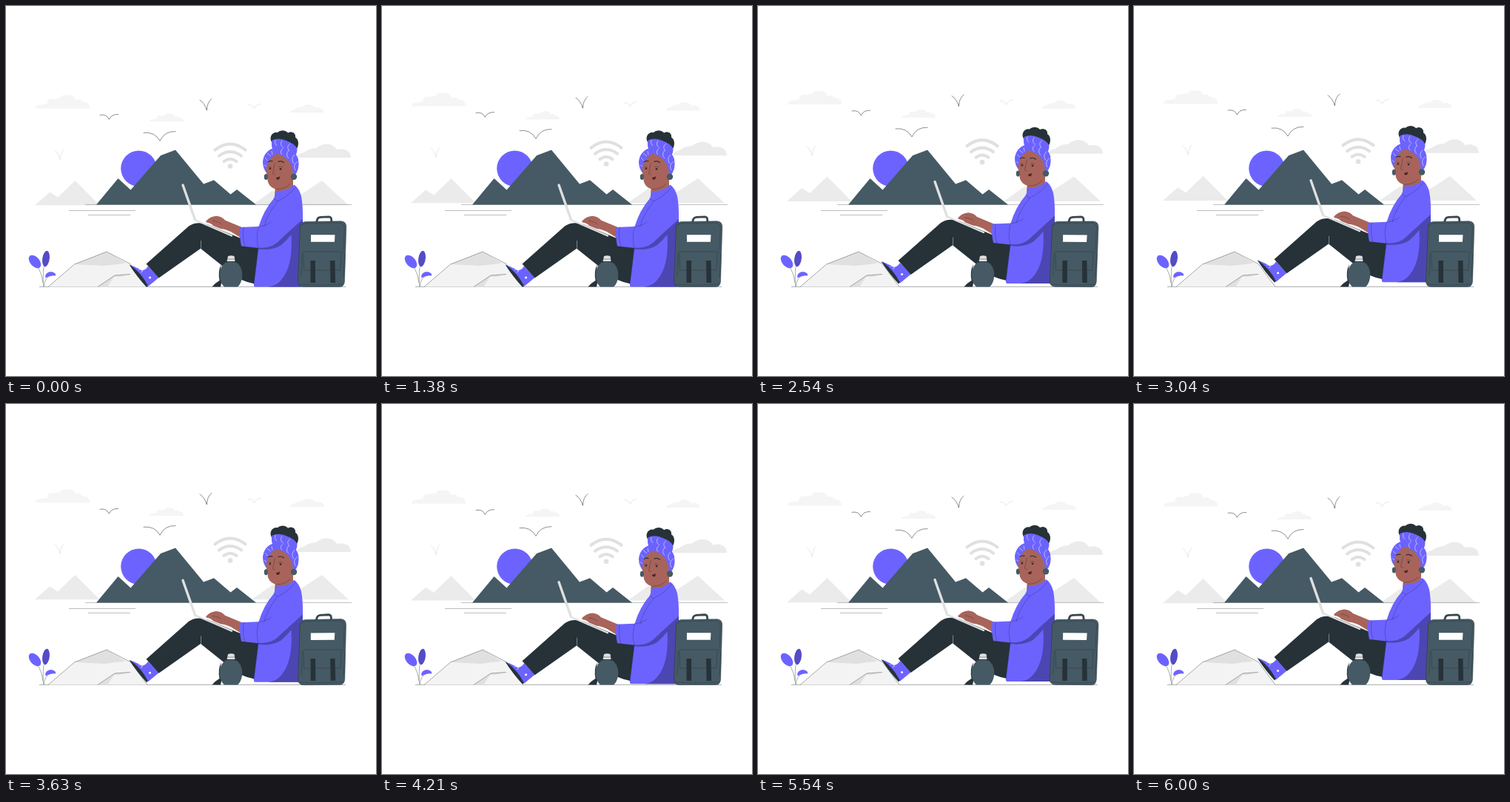
Animation of 500x500 px, one loop 6.04 s. Source, as an HTML page:

```html
<!DOCTYPE html>
<html lang="en">
<head>
<meta charset="utf-8">
<title>Working outdoors</title>
<style>
  html, body { margin: 0; width: 100%; height: 100%; overflow: hidden; background: #fff; }
  svg { display: block; width: 100vw; height: 100vh; }
  .line { fill: none; stroke: #263238; stroke-width: .55; stroke-linecap: round; stroke-linejoin: round; }
  .thin { fill: none; stroke: #263238; stroke-width: .4; }
  .faint { stroke: #d5d5d5; }
  .seam { stroke: #302b78; stroke-width: .4; }
  .slate { fill: #455a64; }
  .dark { fill: #263238; }
  .violet { fill: #6c63ff; }
  .shade { fill: #4c46b3; }
  .skin { fill: #a8645a; }
  .pale { fill: #f5f5f5; }
  .mist { fill: #ebebeb; }
  .grey { fill: #e0e0e0; }
</style>
</head>
<body>
<svg viewBox="0 0 500 500">
  <defs>
    <path id="cloud" d="M0 18.5C0 14 4 13 8 13.5Q12 11.5 15.5 12.5C15 6 21 4 25 6Q28 4 32 5C35 0 40-.5 44 .8C49-.5 53 3 54 7C58 5 62 6.5 63 9.5C69 9 73 12 73 18.5Z"/>
    <path id="dome" d="M0 18.5C0 14 5 12 9 11.5Q15 6 26 5.5Q32 0 40 0Q49 0 54 8Q60 5.5 65 8Q72 9.5 72.5 18.500Z"/>
  </defs>

  <g id="sky">
    <use href="#cloud" class="pale" x="40" y="120"/>
    <use href="#cloud" class="pale" transform="translate(194 145) scale(.63 .6)"/>
    <use href="#dome" class="pale" transform="translate(384 133) scale(.63 .6)"/>
    <use href="#dome" class="mist" x="393.5" y="186.5"/>
    <path class="mist" d="M39 269.300L59 251.500L70 258.500L93.500 236L126.500 269.300ZM332 269.300L360 249.500L384 264L427 236L463 269.300Z"/>
  </g>

  <circle class="violet" cx="179.400" cy="219.600" r="24.200"/>
  <path class="slate" d="M122 268.500L151.500 233L168.500 248.500L209 202L229 194.500L267 240.500L281 235.300L303.500 254.500L312 248L338 268.500Z"/>
  <path class="thin" opacity=".8" d="M107 268.400H467M85 276.500H175M111 282.400H168"/>

  <g id="air">
    <g class="line">
      <path d="M127 147.300Q136 145.500 139.300 153.300Q142.500 146 151.500 146.500"/>
      <path d="M186 171.300Q201 169.500 208 182.300Q214 169 229 169.500"/>
      <path d="M262 127Q268.500 131 271.300 141Q271.800 130 278 125.300"/>
      <path class="faint" d="M327 133.500Q333 133 335.500 138.800Q337.500 132.800 344 132.500M66 195Q71 199 73 207.500Q73.500 199 78 194"/>
    </g>
    <path fill="none" stroke="#e0e0e0" stroke-width="4" stroke-linecap="round" d="M282.500 194.500Q303 178.500 323.500 194.500M288 202.500Q303 191.500 318 202.500M294.500 210Q303 203.500 311.500 210"/>
    <circle class="grey" cx="303" cy="216.500" r="3.300"/>
  </g>

  <path class="thin" d="M45 379.400H459"/>

  <g id="rock">
    <path fill="#f3f3f3" d="M57 379.500L92.500 349L136 332L168 348.500L191 379.500Z"/>
    <path class="grey" d="M92.500 349L136 332L162 347.500L133 351ZM124 379.500L147 364L168 362.500L155 366L146 366L137 379.500Z"/>
    <path class="thin" d="M57 379.500L92.500 349L136 332L168 348.500L191 379.500M124 379.500L147 364L168 362.500"/>
  </g>

  <g id="plant">
    <path class="thin" d="M51 379Q49 362 41 349M50 374Q49 356 54 338M51 379Q52 367 62 363"/>
    <ellipse class="violet" cx="39" cy="345.500" rx="6.300" ry="10.300" transform="rotate(-42 39 345.500)"/>
    <ellipse cx="54" cy="341.500" rx="4.800" ry="10.800" transform="rotate(8 54 341.500)" fill="#544cc6"/>
    <path class="violet" d="M53.500 367.500C52 361 58 358.500 63 359.500Q68 361 67 364.500Q62 363.500 53.500 367.500Z"/>
  </g>

  <g id="woman">
    <g id="shoe">
      <path class="violet" d="M167 350Q177 353 183 357.500Q189 357 192 351.500L206.500 367L192 379Z"/>
      <path class="dark" d="M166.500 349.500L169 351Q183 361 191.800 378L190 380Q177 366 166.500 349.500Z"/>
      <path d="M179 357l3-3M182 360l3-2" stroke="#fff" stroke-width=".7"/>
      <circle cx="194.500" cy="367" r="1.500" fill="#fff"/>
    </g>
    <path class="dark" d="M189.500 348.500L247 297.500Q257 290.500 272 295L315 313L345 320V376.500Q325 375 311 366L289 348.500L263 327.800L206.500 367.500Z"/>
    <path d="M263.500 317V328" stroke="#fff" stroke-width=".4"/>

    <g id="laptop" fill="none" stroke="#e0e0e0" stroke-linecap="round">
      <path d="M257 289.800L305 310.500" stroke-width="2.200"/>
      <path d="M239 242L255.500 289" stroke-width="3.400"/>
    </g>
    <path class="skin" d="M270 291Q276 284.300 284 283.800Q291 284 296 289.500L320 299.500V315L308 307.500Q300 302 290 301L280 297Q277 293 271 292.500Z"/>
    <path class="thin" d="M279 290.500Q287 290.500 291 295"/>

    <path class="skin" d="M364 239L388 232V246L378 255L363 256Z"/>
    <path class="violet" d="M362 260L365 250Q380 251 389.500 241.500Q396 246 399 257Q401.500 270 401 290L399 379.500H337Q334.500 379.500 335 376L341 327L318 324.500Q315 311 316.500 299L341.500 298Q348 276 362 260Z"/>
    <path class="shade" d="M401 288Q382 305 366 320Q356 328 341 326.500V328.500Q360 331 372 323Q380 316 385.500 309Q388 352 372 370Q366 378 355 379.500H399Z"/>
    <path class="line seam" d="M362 260L367 264Q383 256 391 245M367 264Q353 281 349 298M341.500 298Q337 313 341 327M321 299Q319 313 323 325M343 298Q352 297 358 292M341 327L335 376"/>

    <g id="head">
      <path class="dark" d="M359 184C355 177 360 169.500 367 171C371 166.500 379 168 381 171.500C387 168 392 173 391 177.500C397 181 395.500 191 391.500 195Q374 187 359 184Z"/>
      <path class="violet" d="M359.500 181.500Q369 177 380 182.500Q390 186 393.500 193Q393.500 200 390 203L362 197Q357.500 190 359.500 181.500Z"/>
      <path class="violet" d="M352.500 226Q347 220 347 210Q349 194 366 191Q389 189 395 207Q397.500 222 389 230Z"/>
      <path class="skin" d="M351.500 223Q352 207 366 199.500Q382 204 387 219L388 236Q380 247.500 367 248Q357 246.500 354 238Z"/>
      <path fill="none" stroke="#d8d5ff" stroke-width=".7" d="M350 205l4 4M353 199l5 4M359 196l1 5M374 193Q369 197 373 201M382 195Q377 201 382 206M390 201Q384 207 389 213M394 210Q387 215 391 222M364 181Q362 186 366 189M373 182Q369 188 375 192M384 186Q378 190 383 196M349 215l3 2"/>
      <path class="line" style="stroke-width:1.200" d="M354.500 210.500Q357 208.800 360 209.800M368 210.500Q371 208.500 375.500 211.500"/>
      <circle class="dark" cx="356.800" cy="219.800" r="1.300"/>
      <circle class="dark" cx="371" cy="220.300" r="1.400"/>
      <path class="thin" d="M354 217.500Q357 216.500 359 218.500M368 217.500Q371 216 374 218.500M363.500 212Q361.500 221 360.500 226.500Q362 228 364 227.500"/>
      <path fill="#4b2426" d="M364.500 232.500Q367 231.500 369.500 230.300Q370.500 234.500 367.500 234.700Q365.500 234.500 364.500 232.500Z"/>
      <path class="thin" d="M365 247.500Q377 248 384 240"/>
      <ellipse class="slate" cx="351.300" cy="231" rx="2.500" ry="4"/>
      <circle class="slate" cx="389" cy="230.700" r="4.200"/>
    </g>
  </g>

  <g id="bag">
    <path fill="none" stroke="#37474f" stroke-width="2.800" d="M419.500 292L421 287.500Q422 285.500 425 285.300L436 284.800Q439 285 439.500 287L440 292"/>
    <path class="slate" stroke="#263238" stroke-width=".5" d="M397.500 298Q398.500 291.800 405 291.400L453 290.800Q460 291.300 459.800 299L457.500 372Q457 379.300 451 379.500H402Q394.500 379.500 394.500 372Z"/>
    <path class="thin" d="M399 297Q401 293.500 408 293.500L450 293Q457 293 457.500 300L456 330M397 376Q425 378.500 455 376M400 334Q401 332 405 332H454Q458 333 457.500 338L456 367M402 334L402.500 357H452L453 334M400 334L399 365"/>
    <path fill="#fff" d="M412 309.300H444.500L444 318.800H412Z"/>
    <path class="dark" d="M411.500 344H418V374H411.500ZM438 344H444.500L445 374H438.500Z"/>
  </g>

  <g id="bottle">
    <path class="dark" d="M291 349Q286 358 288.500 371Q283 374 278.500 379.500H290Q290.500 375 292 372Q288 362 291 349Z"/>
    <path class="slate" d="M296.500 346.800Q304 344 311.500 346.800C321.500 353 321.500 372 313 379.500H295C286.500 372 286.500 353 296.500 346.800Z"/>
    <path class="grey" d="M300 338Q304 336.500 308.500 338L309.500 345H298.500Z"/>
    <path class="thin" d="M299 342H309"/>
  </g>
</svg>
<script>
const LOOP = 6040;
const FLOAT = 6.4;
const RISE_DELAY = 1500;
const [sky, air, woman, bag] = ["sky", "air", "woman", "bag"].map(id => document.getElementById(id));

// 0 -> 1 -> 0, linear in both halves
const triangle = (t, period) => 1 - Math.abs(1 - 2 * (t % period) / period);
// 0 -> 1 -> -1 -> 0, linear between the quarters
const sway = (t, period) => 2 * triangle(t + period / 4, period) - 1;

const lift = (part, amount) => part.setAttribute("transform", `translate(0 ${-FLOAT * amount})`);

function draw(t) {
  const drift = triangle(t, 6000);
  lift(sky, drift);
  lift(air, drift);
  lift(woman, t < RISE_DELAY ? 0 : triangle(t - RISE_DELAY, 3000));
  bag.setAttribute("transform", `rotate(${-0.5 * sway(t, 3000)} 427 335)`);
}

const start = performance.now();
function tick() {
  draw((performance.now() - start) % LOOP);
  requestAnimationFrame(tick);
}
tick();
</script>
</body>
</html>
```
